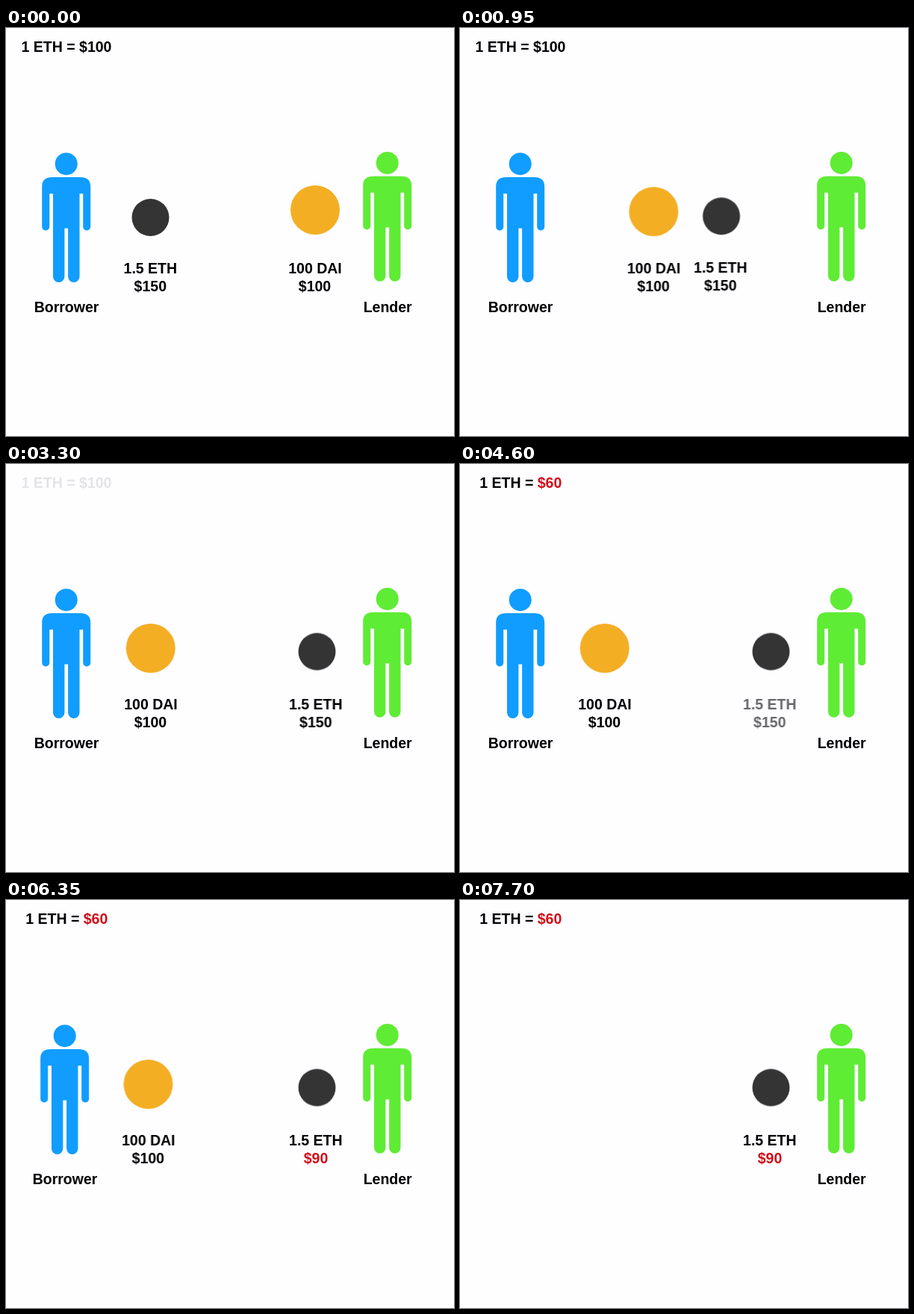
Animation, 600 px wide and 547 px high, one loop 7750 ms. Source, as an HTML page:

```html
<!DOCTYPE html>
<html lang="en">
<head>
<meta charset="utf-8">
<title>Loan and falling collateral</title>
<style>
  html, body { margin: 0; width: 100%; height: 100%; overflow: hidden; background: #fefdff; }
  svg { display: block; width: 600px; height: 547px; }
  text { font: bold 19.5px "Liberation Sans", Arial, sans-serif; text-anchor: middle; }

  .blue { fill: #109dff; }
  .green { fill: #5fec34; }
  .red { fill: #d0101a; }
  .dai { fill: #f3ae24; }
  .eth { fill: #343434; }

  .swap, .lift, .fade, .leave { animation: 7750ms linear infinite; }
  .swap { animation-name: swap; }
  .lift { animation-name: lift; }
  .leave { animation-name: leave; }
  .old-price { animation-name: old-price; }
  .new-price { animation-name: new-price; }
  .old-value { animation-name: old-value; }
  .new-value { animation-name: new-value; }

  /* the two assets change hands */
  @keyframes swap {
    0%, 4.13% { transform: translate(0, 0); animation-timing-function: cubic-bezier(.37, 0, .63, 1); }
    17.03%, 100% { transform: translate(var(--x), var(--y, 0px)); }
  }
  @keyframes lift {
    0%, 4.13% { transform: translateY(0); }
    9%, 13% { transform: translateY(-1px); }
    17.03%, 100% { transform: translateY(0); }
  }

  /* the rate drops, then the collateral's value */
  @keyframes old-price { 0%, 36.77% { opacity: 1; } 43.23%, 100% { opacity: 0; } }
  @keyframes new-price { 0%, 45.81% { opacity: 0; } 53.55%, 100% { opacity: 1; } }
  @keyframes old-value { 0%, 56.77% { opacity: 1; } 63.23%, 100% { opacity: 0; } }
  @keyframes new-value { 0%, 69.94% { opacity: 0; } 78.06%, 100% { opacity: 1; } }

  /* the borrower walks off with the loan */
  @keyframes leave {
    0%, 79.35% { transform: translateX(0); animation-timing-function: cubic-bezier(.333, 0, .667, 0); }
    91.35%, 100% { transform: translateX(var(--out)); }
  }
</style>
</head>
<body>
<svg viewBox="0 0 600 547">
  <defs>
    <g id="person">
      <circle cx="80.7" cy="182.2" r="15"/>
      <path d="M48.2 212.5C48.2 204 53 200 62 200H99.4C108.4 200 113.2 204 113.2 212.5
               V266.5a5 5 0 0 1-10 0V222h-4.7V333.3a7.7 7.7 0 0 1-15.4 0V268.5h-4.7
               V333.3a7.7 7.7 0 0 1-15.4 0V222H58.2V266.5a5 5 0 0 1-10 0Z"/>
    </g>
  </defs>

  <text class="fade old-price" x="81" y="31.5">1 ETH = $100</text>
  <text class="fade new-price" x="81.3" y="31.5">1 ETH = <tspan class="red">$60</tspan></text>

  <use class="leave blue" href="#person" style="--out:-203px"/>
  <text class="leave" x="81" y="381" style="--out:-214px">Borrower</text>

  <use class="green" href="#person" x="430" y="-1.3"/>
  <text x="511.2" y="381">Lender</text>

  <g class="leave" style="--out:-318px">
    <circle class="swap dai" cx="414" cy="244" r="33" style="--x:-220.3px;--y:3px"/>
    <g class="swap" style="--x:-220px">
      <text x="414" y="329">100 DAI</text>
      <text x="413.5" y="353">$100</text>
    </g>
  </g>

  <circle class="swap eth" cx="193.5" cy="254" r="25" style="--x:223px;--y:-2.5px"/>
  <g class="swap" style="--x:221.5px">
    <g class="lift">
      <g class="fade old-value">
        <text x="193.3" y="329">1.5 ETH</text>
        <text x="193.3" y="353">$150</text>
      </g>
    </g>
  </g>
  <g class="fade new-value">
    <text x="414.8" y="329">1.5 ETH</text>
    <text class="red" x="415" y="353">$90</text>
  </g>
</svg>
</body>
</html>
```
